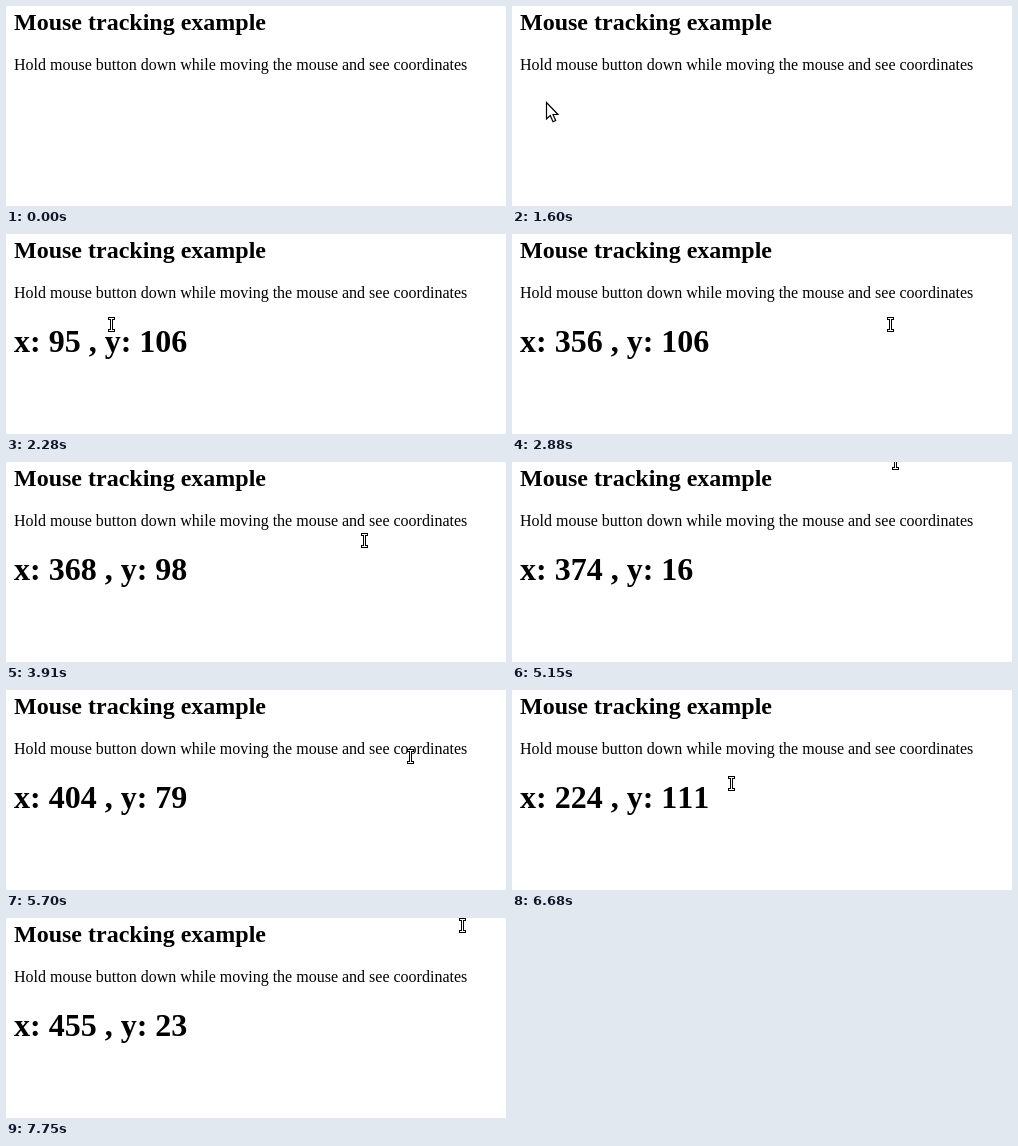
An HTML page that plays this animation: 500x200 px, repeating every 8000 ms.

```html
<!DOCTYPE html>
<html lang="en">
<head>
<meta charset="utf-8">
<title>Mouse tracking example</title>
<style>
  html, body { margin: 0; width: 100%; height: 100%; overflow: hidden; background: #fff; }
  body { font: 16px/17px "Liberation Serif", "Times New Roman", serif; color: #000; }
  h1, h2, p, svg { position: absolute; left: 8px; margin: 0; white-space: pre; }
  h2 { top: 3px; font-size: 24px; line-height: 26px; }
  p { top: 50px; }
  h1 { top: 89px; font-size: 32px; line-height: 36px; font-kerning: none; }
  svg { left: 0; top: 0; }
</style>
</head>
<body>
<h2>Mouse tracking example</h2>
<p>Hold mouse button down while moving the mouse and see coordinates</p>
<h1 id="coords"></h1>
<svg width="500" height="200">
  <path id="arrow" d="M0 0V16.5L3.8 13L6.5 19.2L9.2 18L6.5 12H11.5Z" fill="#fff" stroke="#000" stroke-width="1.2"/>
  <g id="beam" fill="none" stroke-linecap="square">
    <path d="M-2 -6H2M0 -6V6M-2 6H2" stroke="#000" stroke-width="3"/>
    <path d="M-2 -6H2M0 -6V6M-2 6H2" stroke="#fff"/>
  </g>
</svg>
<script>
const LOOP = 8000, ENTER = 1120, PRESS = 1760, LAG = 37;

// Points the pointer sweeps through: time, x, y
const keys = [
  [ENTER, 62, 198], [1600, 35, 97], [2000, 45, 92], [2760, 291, 91], [2880, 379, 91],
  [3350, 409, 98], [3590, 409, 98], [4610, 198, 3], [5160, 386, 1], [5700, 405, 67],
  [6040, 396, 80], [6630, 227, 96], [7170, 214, 6], [7390, 214, 6], [7725, 457, 8]
];
const last = keys.length - 1;

const slope = (i, c) => (keys[i + 1][c] - keys[i][c]) / (keys[i + 1][0] - keys[i][0]);

// Mean of the neighbouring slopes, zero at turns and rests
function tangent(i, c) {
  if (i === 0 || i === last) return 0;
  const a = slope(i - 1, c), b = slope(i, c);
  return a * b > 0 ? (a + b) / 2 : 0;
}

function pointer(t) {
  let i = 0;
  while (i < last - 1 && t >= keys[i + 1][0]) i++;
  const from = keys[i], to = keys[i + 1], span = to[0] - from[0];
  const u = Math.min(1, Math.max(0, (t - from[0]) / span)), v = 1 - u;
  return [1, 2].map(c => Math.round(
    from[c] * v * v * (1 + 2 * u) + to[c] * u * u * (3 - 2 * u) +
    span * u * v * (tangent(i, c) * v - tangent(i + 1, c) * u)));
}

const [coords, arrow, beam] = ["coords", "arrow", "beam"].map(id => document.getElementById(id));

function place(el, shown, x, y) {
  el.style.display = shown ? "" : "none";
  el.setAttribute("transform", `translate(${x - 0.5} ${y - 0.5})`);
}

function draw(t) {
  const [x, y] = pointer(t), [px, py] = pointer(t - LAG);
  const pressed = t >= PRESS;
  place(arrow, t >= ENTER && !pressed, x, y);
  place(beam, pressed, x, y);
  coords.textContent = pressed ? `x: ${px - 1} , y: ${py + 15}` : "";
}

const start = performance.now();
function tick() {
  draw((performance.now() - start) % LOOP);
  requestAnimationFrame(tick);
}
tick();
</script>
</body>
</html>
```
